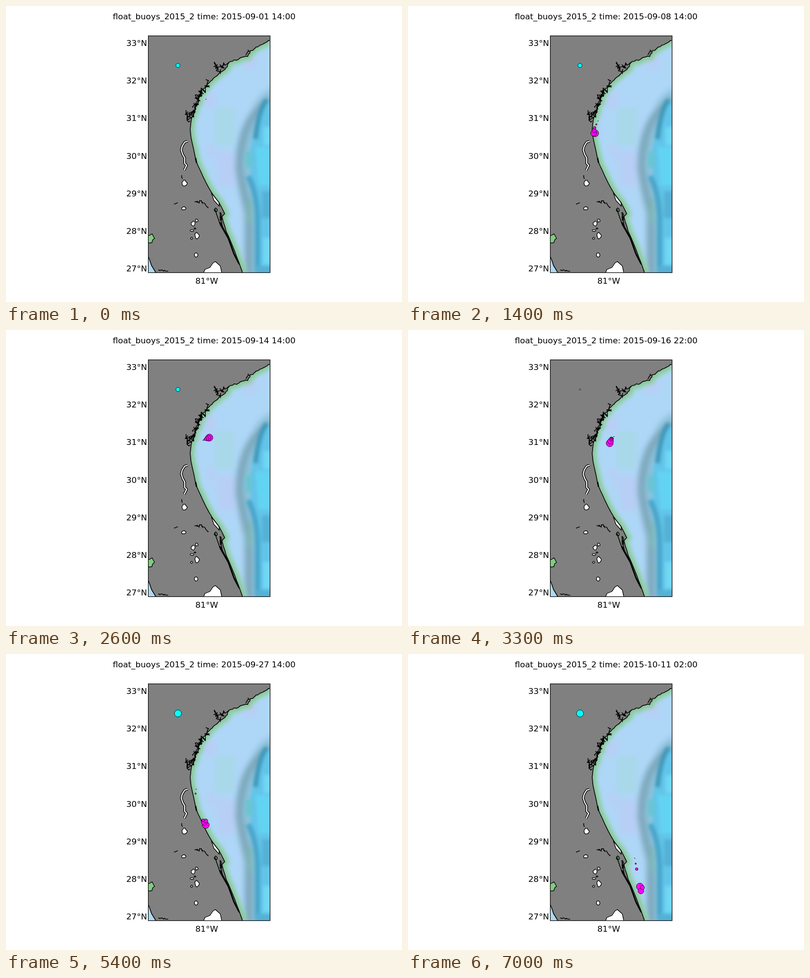
These frames come from a looping animation (800x600 px, 7.1 s). An HTML page:

```html
<!DOCTYPE html>
<html lang="en">
<head>
<meta charset="utf-8">
<title>Drift track</title>
<style>
html, body { margin: 0; width: 100%; height: 100%; overflow: hidden; background: #fff; }
svg { display: block; width: 800px; height: 600px; }
text { font: 16.67px "DejaVu Sans", sans-serif; text-anchor: middle; }
#lats text { text-anchor: end; }
path { stroke-linejoin: round; }
.line { fill: none; stroke: #000; stroke-width: 1.5; }
.lake { fill: #fff; stroke: #000; stroke-width: 1.3; }
.pond { fill: #4d8c58; }
.bay { fill: #82cc82; }
.dot { stroke: #000; stroke-width: .8; }
</style>
</head>
<body>
<svg viewBox="0 0 800 600">
  <defs>
    <path id="coast"/>
    <clipPath id="map"><path d="M288 61H533V540H288Z"/></clipPath>
    <clipPath id="sea"><path id="water"/></clipPath>
    <filter id="soft" x="-1" y="-1" width="3" height="3"><feGaussianBlur stdDeviation="3"/></filter>
    <filter id="softer" x="-1" y="-1" width="3" height="3"><feGaussianBlur stdDeviation="6"/></filter>
  </defs>
  <g clip-path="url(#map)">
    <rect width="800" height="600" fill="gray"/>
    <g clip-path="url(#sea)">
      <rect width="800" height="600" fill="#aed6f7"/>
      <g filter="url(#softer)">
        <path fill="#b8cef5" d="M478 95H506V127H478ZM396 175H424V205H400ZM428 296H462V365H430ZM402 282H424V328Z"/>
        <path fill="#8fc3dc" d="M545 165Q512 172 497 210Q466 255 464 310Q468 350 480 375L488 550H550Z"/>
        <path fill="none" stroke="#7ca6b9" stroke-width="15" d="M535 190Q500 215 487 245Q472 282 471 330Q478 372 490 420V545"/>
        <path fill="none" stroke="#7db9b2" stroke-width="10" d="M494 390V440"/>
      </g>
      <g filter="url(#soft)">
        <path fill="#a8d8e9" d="M422 206H462V281H422Z"/>
        <path fill="#62c4e9" d="M540 190Q507 205 502 245L490 312 505 400V545H545Z"/>
        <path fill="none" stroke="#3f98b9" stroke-width="10" d="M527 190Q510 210 504 270"/>
        <path fill="none" stroke="#49a5ca" stroke-width="11" d="M489 345Q507 378 508 430V540"/>
        <path fill="none" stroke="#6ac4d2" stroke-width="14" d="M491 295V328"/>
        <path fill="#64d3f2" d="M504 286H540V364H510Z"/>
        <path fill="#70d7f5" d="M520 245H540V282H520ZM519 470H540V524H519Z"/>
        <path fill="#54b1d5" d="M517 376H540V430H517ZM505 527H540V548H505Z"/>
        <use href="#coast" fill="none" stroke="#91d1a4" stroke-width="21" opacity=".8"/>
        <use href="#coast" fill="none" stroke="#76b67c" stroke-width="6" opacity=".7"/>
      </g>
    </g>
    <use href="#coast" class="line"/>
    <path class="line" style="fill:#b0daf2" d="M286 505L290 514 294 526 303 541H286Z"/>
    <g id="land"></g>
    <path id="river" class="line" style="stroke-width:5" d="M367 274L361 276 356 284 354 292 357 301 361 308 361 319 365 323 360 333"/>
    <use href="#river" style="stroke:#fff;stroke-width:2" id="flow"/>
    <path class="lake" d="M399 541L402 534 412 530 418 521 423 518 433 527 436 541ZM415 379L430 398 431 406 420 394Z"/>
    <path class="line" d="M422 412L433 444 449 472 461 505 471 524M432 418L437 447"/>
    <path class="line" style="stroke-width:2.6" d="M432 438L449 470 460 501 470 521M383 308L385 318"/>
  </g>
  <rect x="287.5" y="60.5" width="246" height="480" fill="none" stroke="#000" stroke-width="1.2"/>
  <g id="lats"></g>
  <text x="405.5" y="563">81°W</text>
  <text id="title" x="400.3" y="27"></text>
  <circle id="station" class="dot" cx="347.4" cy="120.5" fill="#0ff"/>
  <g id="trail"></g>
</svg>
<script>
const STEP = 100, COUNT = 71;
const RADII = [0.5, 1.4, 2.7, 4.1, 5.8, 7.1];
const START = Date.UTC(2015, 8, 1, 14);

// [step, hours since start]
const CLOCK = [
  [0, 0], [29, 348], [33, 368], [41, 400], [42, 440], [43, 444], [49, 540],
  [50, 552], [51, 612], [54, 624], [67, 896], [68, 940], [70, 948]
];

// [step, x, y]
const TRACK = [
  [0, 404, 189], [9, 384, 233], [11, 377, 247], [13, 375, 258], [14, 378, 258],
  [17, 376, 243], [18, 381, 238], [20, 395.5, 224.5], [28, 416, 216], [29, 412, 219],
  [31, 411, 221], [33, 407.5, 229.5], [38, 411, 220], [41, 404.5, 232.5], [42, 389.5, 263.5],
  [43, 388.5, 269.5], [49, 384, 274], [50, 383, 283], [51, 398, 337], [52, 403.5, 338.5],
  [53, 401, 341.5], [54, 403.5, 346.5], [65, 458, 414], [67, 462, 436], [68, 473.5, 473.5],
  [69, 470.5, 480.5], [70, 468.5, 471.5]
];

const SHORE = [
  [534, 69], [516, 78], [494, 91], [487, 101], [462, 110], [450, 115], [443, 129], [431, 136],
  [418, 147], [396, 172], [385, 199], [375, 228], [372, 250], [374, 266], [384, 314],
  [398, 346], [416, 380], [430, 398], [442, 421], [436, 427], [445, 457], [458, 487], [478, 541]
];

// [x1, y1, x2, y2, spread]
const CREEKS = [
  [420, 114, 432, 136, 4], [424, 127, 448, 117, 5], [411, 154, 387, 182, 6],
  [392, 174, 381, 206, 6], [382, 200, 369, 234, 6], [362, 212, 373, 232, 4],
  [485, 97, 493, 89, 3], [339, 399, 350, 401, 3], [383, 394, 397, 399, 4],
  [401, 400, 410, 411, 2], [308, 535, 330, 538, 2], [354, 343, 358, 352, 2]
];

// [x, y, rx, ry, kind]
const LAKES = [
  [360, 359, 6, 7], [359, 410, 5, 4], [378, 441, 4, 5], [385, 435, 3, 3], [376, 455, 4, 2],
  [382, 451, 2, 1], [375, 471, 2, 2], [386, 466, 5, 7], [384, 505, 4, 5],
  [424, 413, 3, 4, "pond"], [434, 428, 2, 9, "pond"], [291, 471, 9, 9, "bay"]
];

const el = id => document.getElementById(id);
const toPath = pts => "M" + pts.map(p => p.map(v => v.toFixed(1)).join(" ")).join("L");

let seed = 7;
const jitter = amp => {
  seed = seed * 16807 % 2147483647;
  return (seed / 2147483647 * 2 - 1) * amp;
};

function make(tag, attrs, parent) {
  const node = document.createElementNS(parent.namespaceURI, tag);
  for (const key in attrs) node.setAttribute(key, attrs[key]);
  return parent.appendChild(node);
}

// Points along a segment, each nudged at random.
function wander([x1, y1], [x2, y2], amp, gap) {
  const n = Math.max(1, Math.round(Math.hypot(x2 - x1, y2 - y1) / gap));
  return Array.from({ length: n }, (_, i) => [
    x1 + (x2 - x1) * i / n + jitter(amp),
    y1 + (y2 - y1) * i / n + jitter(amp)
  ]);
}

function drawMap() {
  const pts = SHORE.slice(1).flatMap((p, i) =>
    wander(SHORE[i], p, p[1] < 245 ? 1.6 : 0.3, p[1] < 245 ? 4 : 12));
  const shore = toPath([...pts, SHORE[SHORE.length - 1]]);
  el("coast").setAttribute("d", shore);
  el("water").setAttribute("d", shore + "H540V60Z");

  for (const [x1, y1, x2, y2, amp] of CREEKS) {
    const creek = wander([x1, y1], [x2, y2], amp, amp > 3 ? 1.4 : 2.5);
    make("path", { class: "line", d: toPath(creek) }, el("land"));
  }
  for (const [x, y, rx, ry, kind = ""] of LAKES) {
    const rim = Array.from({ length: 11 }, (_, i) => {
      const a = i / 11 * Math.PI * 2, k = 0.9 + jitter(0.22);
      return [x + Math.cos(a) * rx * k, y + Math.sin(a) * ry * k];
    });
    make("path", { class: "lake " + kind, d: toPath(rim) + "Z" }, el("land"));
  }
  const flow = make("path", { d: el("river").getAttribute("d"), fill: "none", stroke: "#fff", "stroke-width": 2.2 }, el("flow").parentNode);
  el("flow").replaceWith(flow);

  for (let lat = 33; lat >= 27; lat--) {
    make("text", { x: 285, y: Math.round(81 + (33 - lat) * 76.2) }, el("lats")).textContent = lat + "°N";
  }
}

function sample(table, step) {
  const i = Math.max(1, table.findIndex(row => row[0] >= step));
  const a = table[i - 1], b = table[i];
  const k = (step - a[0]) / (b[0] - a[0]);
  return a.slice(1).map((v, j) => v + (b[j + 1] - v) * k);
}

drawMap();

// Newest and largest dot lies underneath.
const dots = RADII.map(() => make("circle", { class: "dot", fill: "#f0f" }, el("trail")));

function draw(step) {
  const hours = Math.round(sample(CLOCK, step)[0] / 4) * 4;
  const date = new Date(START + hours * 3600000).toISOString();
  el("title").textContent = `float_buoys_2015_2 time: ${date.slice(0, 10)} ${date.slice(11, 16)}`;

  const newest = Math.min(step, RADII.length - 1);
  dots.forEach((dot, age) => {
    const shown = age <= newest;
    dot.setAttribute("visibility", shown ? "visible" : "hidden");
    if (!shown) return;
    const [x, y] = sample(TRACK, step - age);
    dot.setAttribute("cx", x);
    dot.setAttribute("cy", y);
    dot.setAttribute("r", RADII[newest - age]);
  });

  el("station").setAttribute("r", step < 32 ? RADII[3] : RADII[Math.min(step - 32, 5)]);
}

const begin = performance.now();
let last = -1;

function tick() {
  const step = Math.floor((performance.now() - begin) / STEP) % COUNT;
  if (step !== last) draw(last = step);
  requestAnimationFrame(tick);
}
tick();
</script>
</body>
</html>
```
